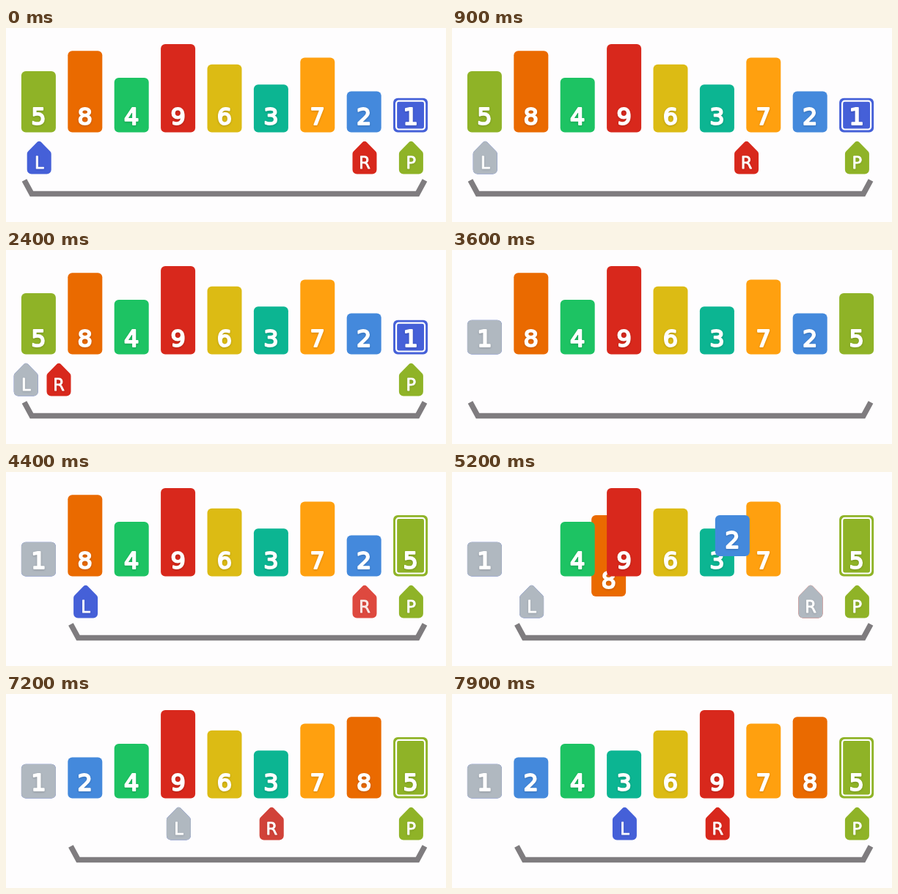
Animation of 600x265 px, one loop 8000 ms. Source, as an HTML page with a canvas:

```html
<!DOCTYPE html>
<html lang="en">
<head>
<meta charset="utf-8">
<title>Quicksort</title>
<style>
html, body { margin: 0; width: 100%; height: 100%; overflow: hidden; background: #fefdfe; }
canvas { display: block; }
</style>
</head>
<body>
<canvas width="600" height="265"></canvas>
<script>
const ctx = document.querySelector('canvas').getContext('2d');
const LOOP = 8000, STEP = 282, SWAP = 540, FADE = 120, FLOOR = 142.5;
const GRAY = '#b0b8c0';
const COLORS = [, '#4560d8', '#4489dc', '#0cb592', '#1dc363', '#8fb327', '#dcbb14', '#ffa00f', '#ea6a00', '#d8281c'];
const START = [5, 8, 4, 9, 6, 3, 7, 2, 1];
// The left bar passes below and behind, the right bar above and in front.
const SWAPS = [
  { at: 2750, left: 5, right: 1, from: 0, to: 8 },
  { at: 5010, left: 8, right: 2, from: 1, to: 7 },
  { at: 7300, left: 9, right: 3, from: 3, to: 5 }
];

const slotX = i => 44.4 + 63.4 * i;
const seg = (t, at, len) => Math.min(1, Math.max(0, (t - at) / len));
const ease = (t, at, len) => (1 - Math.cos(Math.PI * seg(t, at, len))) / 2;

// Number of slots walked, one eased step after another.
function walk(t, at, steps) {
  let sum = 0;
  for (let i = 0; i < steps; i++) sum += ease(t, at + i * STEP, STEP);
  return sum;
}

// How gray something is, from [on, off] spans.
const grayness = (t, spans) =>
  spans.reduce((sum, [on, off]) => sum + seg(t, on, FADE) - seg(t, off, 60), 0);

const visible = (t, back) => 1 - seg(t, 3380, FADE) + seg(t, back, FADE);

function fillMix(color, gray) {
  const alpha = ctx.globalAlpha;
  ctx.fillStyle = color;
  ctx.fill();
  if (gray > 0) {
    ctx.globalAlpha = alpha * gray;
    ctx.fillStyle = GRAY;
    ctx.fill();
    ctx.globalAlpha = alpha;
  }
}

function label(text, x, y, size, weight) {
  ctx.save();
  ctx.font = `${size}px "DejaVu Sans", sans-serif`;
  ctx.textAlign = 'center';
  ctx.lineJoin = 'round';
  ctx.lineWidth = weight;
  ctx.fillStyle = ctx.strokeStyle = '#fff';
  ctx.shadowColor = 'rgba(0,0,0,.2)';
  ctx.shadowBlur = 3;
  ctx.shadowOffsetY = 1;
  ctx.strokeText(text, x, y);
  ctx.shadowColor = 'transparent';
  ctx.fillText(text, x, y);
  ctx.restore();
}

function bar({ value, x, y }, gray, border) {
  const h = 37.6 + 9.2 * value, top = y - h;
  ctx.beginPath();
  ctx.roundRect(x - 23.5, top, 47, h, 6);
  fillMix(COLORS[value], gray);
  if (border > 0) {
    ctx.globalAlpha = border;
    ctx.beginPath();
    ctx.roundRect(x - 19.5, top + 4, 39, h - 8, 3.5);
    ctx.strokeStyle = '#fff';
    ctx.lineWidth = 2.2;
    ctx.stroke();
    ctx.globalAlpha = 1;
  }
  label(value, x, y - 11, 32, 2);
}

function marker(letter, x, color, gray, alpha) {
  if (alpha <= 0) return;
  ctx.save();
  ctx.globalAlpha = alpha;
  ctx.translate(x + 0.8, 0);
  ctx.beginPath();
  ctx.moveTo(0, 199.5);
  ctx.arcTo(-16.5, 199.5, -16.5, 170, 6);
  ctx.arcTo(-16.5, 170, 0, 153, 5);
  ctx.arcTo(0, 153, 16.5, 170, 4);
  ctx.arcTo(16.5, 170, 16.5, 199.5, 5);
  ctx.arcTo(16.5, 199.5, 0, 199.5, 6);
  ctx.closePath();
  fillMix(color, gray);
  label(letter, 0, 192, 22.5, 0.8);
  ctx.restore();
}

function bracket(left) {
  ctx.beginPath();
  ctx.moveTo(left, 208);
  ctx.lineTo(left + 10, 226.5);
  ctx.lineTo(561, 226.5);
  ctx.lineTo(571, 208);
  ctx.strokeStyle = '#7f7c7f';
  ctx.lineWidth = 7.5;
  ctx.stroke();
}

function layout(t) {
  const bars = START.map((value, i) => ({ value, x: slotX(i), y: FLOOR, z: 0 }));
  for (const s of SWAPS) {
    if (t < s.at) continue;
    const p = ease(t, s.at, SWAP), dip = 36 * Math.sin(Math.PI * p), z = p < 1 ? 1 : 0;
    const span = s.to - s.from;
    const find = v => bars.find(b => b.value === v);
    Object.assign(find(s.left), { x: slotX(s.from + span * p), y: FLOOR + dip, z: -z });
    Object.assign(find(s.right), { x: slotX(s.to - span * p), y: FLOOR - dip, z });
  }
  return bars.sort((a, b) => a.z - b.z);
}

function draw(t) {
  const second = t >= 3600, pivot = second ? 5 : 1;
  const pivotShown = visible(t, 4000);

  ctx.fillStyle = '#fefdfe';
  ctx.fillRect(0, 0, 600, 265);
  bracket(25 + 63.4 * ease(t, 3700, 300));

  for (const b of layout(t))
    bar(b, b.value === 1 ? seg(t, 3320, FADE) : 0, b.value === pivot ? pivotShown : 0);

  const leftX = second ? slotX(1 + walk(t, 5600, 2)) : slotX(0) - 20 * ease(t, 2250, 190);
  const rightX = second ? slotX(7 - walk(t, 6610, 2))
    : slotX(7 - walk(t, 500, 7)) + 20 * ease(t, 500 + 6 * STEP, STEP);
  marker('L', leftX, COLORS[1], grayness(t, [[300, 3600], [4600, 5550], [6400, 7835]]), visible(t, 4150));
  marker('R', rightX, COLORS[9], grayness(t, [[2500, 3600], [4800, 5550], [7180, 7835]]), visible(t, 4300));
  marker('P', slotX(8), COLORS[5], 0, pivotShown);
}

const begin = performance.now();
function frame() {
  draw((performance.now() - begin) % LOOP);
  requestAnimationFrame(frame);
}
frame();
</script>
</body>
</html>
```
